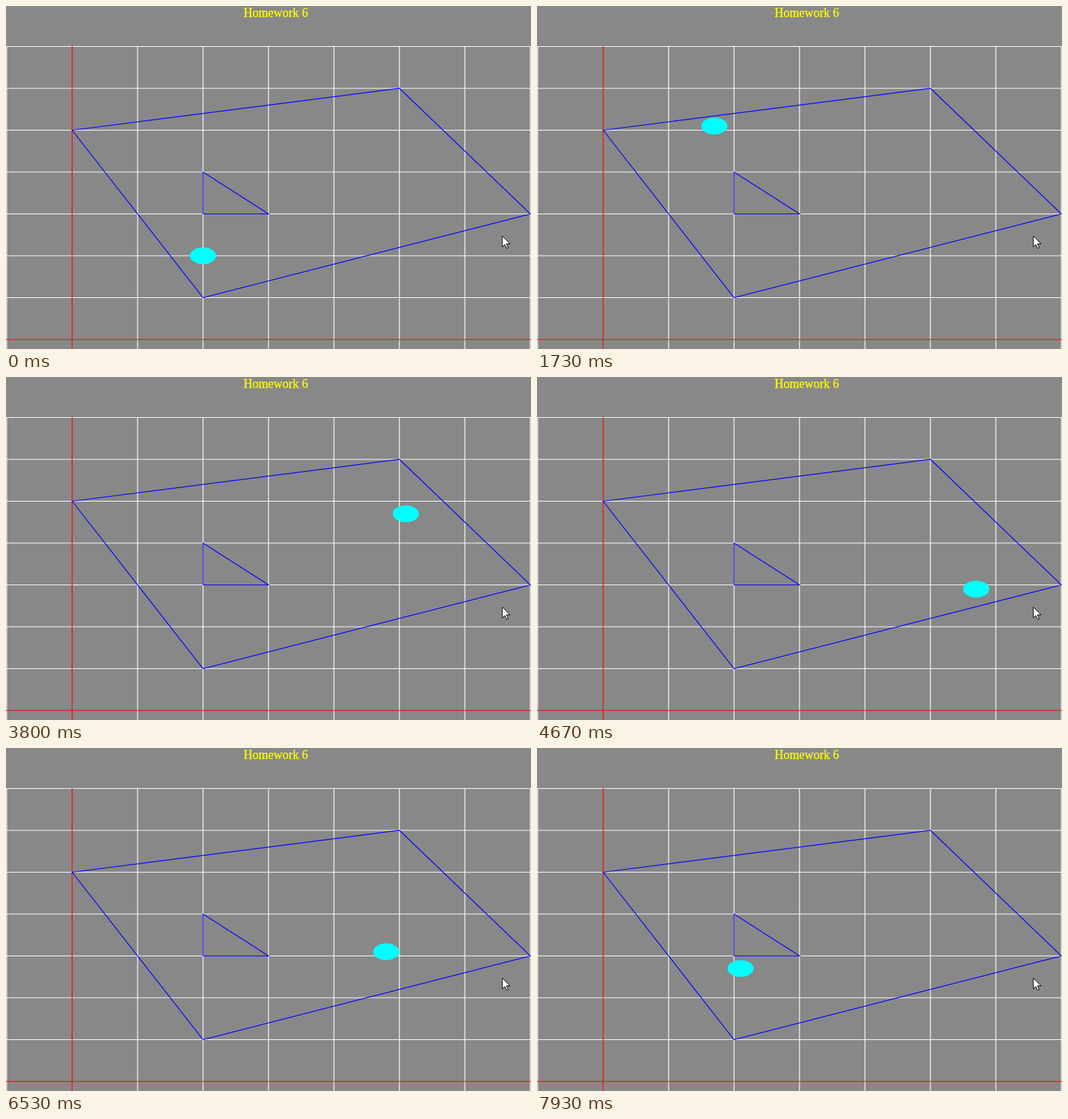
Recreate the animation shown at these times as an HTML page. Size 770 px wide and 504 px high, loop 8000 ms.

```html
<!DOCTYPE html>
<html lang="en">
<head>
<meta charset="utf-8">
<title>Homework 6</title>
<style>
  html, body { margin: 0; width: 100%; height: 100%; overflow: hidden; background: #888; }
  svg { display: block; }
  .lines { fill: none; stroke-width: 1.2; }
</style>
</head>
<body>
<svg width="770" height="504" viewBox="0 0 770 504">
  <rect width="770" height="504" fill="#888"/>
  <text x="395.7" y="16" text-anchor="middle" fill="#ff0" stroke="#ff0" stroke-width=".3"
        font-size="18" font-family="'Liberation Serif', 'Times New Roman', serif">Homework 6</text>
  <path id="grid" class="lines" stroke="#fff"/>
  <path id="axes" class="lines" stroke="#f00"/>
  <path id="walls" class="lines" stroke="#00f"/>
  <ellipse id="ball" rx="19.2" ry="12.3" fill="#0ff"/>
  <path transform="translate(727.5 337.5)" fill="#fff" stroke="#000"
        d="M.5 .5V16.5L4.2 13 6.8 18.7 9.1 17.7 6.6 12H11.7Z"/>
</svg>
<script>
const TICKS = 120;
const TICKS_PER_MS = 0.015;

// World units to stage pixels
const px = x => 97 + 96 * x;
const py = y => 490 - 61.5 * y;

const get = id => document.getElementById(id);
const vertical = x => `M${px(x)} 59V504`;
const horizontal = y => `M0 ${py(y)}H770`;
const polygon = points =>
  'M' + points.map(([x, y]) => `${px(x)} ${py(y)}`).join('L') + 'Z';

const room = [[0, 5], [5, 6], [7, 3], [2, 1]];
const triangle = [[2, 4], [2, 3], [3, 3]];

let grid = '';
for (let i = -1; i <= 7; i++) {
  if (i) grid += vertical(i);
  if (i > 0) grid += horizontal(i);
}
get('grid').setAttribute('d', grid);
get('axes').setAttribute('d', vertical(0) + horizontal(0));
get('walls').setAttribute('d', polygon(room) + polygon(triangle));

// Ball positions are whole tenths of a unit, so the wall tests stay exact.
const directions = { L: [-1, 0], R: [1, 0], U: [0, 1], D: [0, -1] };
const RADIUS = 2;

const inRoom = (x, y) => room.every(([ax, ay], i) => {
  const [bx, by] = room[(i + 1) % room.length];
  return (bx - ax) * (y - 10 * ay) - (by - ay) * (x - 10 * ax) < 0;
});
const fits = (x, y) => Object.values(directions)
  .every(([dx, dy]) => inRoom(x + RADIUS * dx, y + RADIUS * dy));

// First tick, length in ticks, keys. A key without a count is held until a wall.
const presses = [
  [2, 1, 'L'],
  [5, 7, 'U16 L'],
  [14, 8, 'R9 U L'],
  [26, 1, 'R1'],
  [27, 8, 'R15 L13'],
  [38, 5, 'R14 U'],
  [45, 3, 'R11 U'],
  [49, 3, 'R'],
  [55, 3, 'D9 R1'],
  [58, 3, 'D2 R'],
  [66, 6, 'D17 R'],
  [78, 3, 'U7 R'],
  [86, 2, 'D2 R D'],
  [90, 1, 'R1'],
  [94, 8, 'L21 D'],
  [105, 4, 'R L5'],
  [109, 9, 'L13 D L U6 L1 U4'],
  [118, 2, 'R2 U1']
];

function walk(from, keys) {
  const steps = [from];
  let [x, y] = from;
  for (const key of keys.split(' ')) {
    const [dx, dy] = directions[key[0]];
    let left = Number(key.slice(1)) || Infinity;
    while (left-- > 0 && fits(x + dx, y + dy)) steps.push([x += dx, y += dy]);
  }
  return steps;
}

const positions = [];
let rest = [20, 20];
for (const [first, length, keys] of presses) {
  while (positions.length < first) positions.push(rest);
  const steps = walk(rest, keys);
  const last = steps.length - 1;
  for (let i = 1; i <= length; i++) positions.push(steps[Math.round(last * i / length)]);
  rest = steps[last];
}

const ball = get('ball');
function draw(ms) {
  const tick = Math.floor((ms + 5) * TICKS_PER_MS) % TICKS;
  const [x, y] = positions[tick];
  ball.setAttribute('cx', px(x / 10));
  ball.setAttribute('cy', py(y / 10));
}

const start = performance.now();
function loop() {
  draw(performance.now() - start);
  requestAnimationFrame(loop);
}
loop();
</script>
</body>
</html>
```
